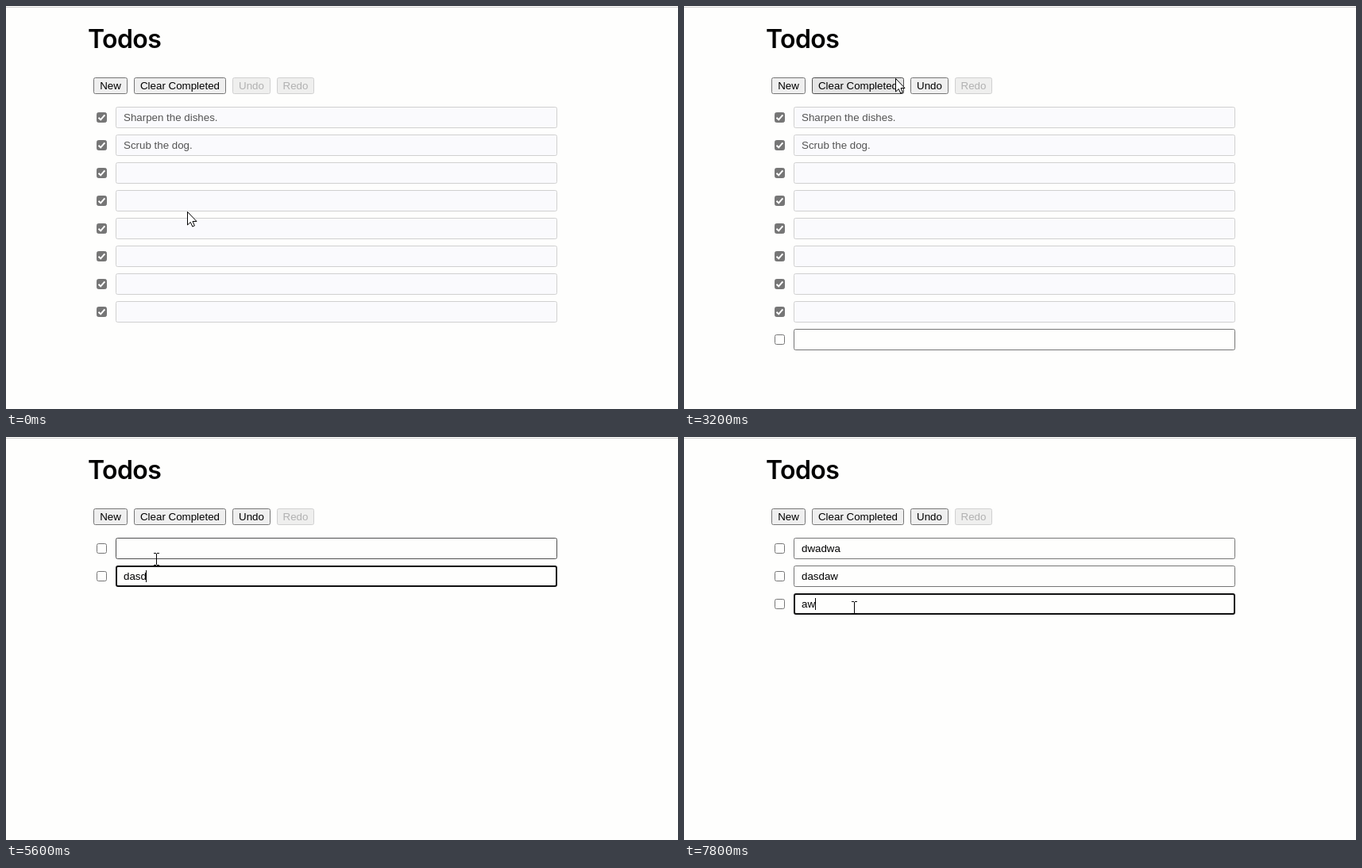
An HTML page with a canvas that plays this animation: 846 by 508 pixels, repeating every 8000 ms.

```html
<!DOCTYPE html>
<html lang="en">
<head>
<meta charset="utf-8">
<title>Todos</title>
<style>
html, body { margin: 0; width: 100%; height: 100%; overflow: hidden; background: #fefefd; }
canvas { display: block; }
</style>
</head>
<body>
<canvas id="stage" width="846" height="508"></canvas>
<script>
const ctx = document.getElementById('stage').getContext('2d');
const LOOP = 8000, STEP = 200, LETTER = 100;
const PAPER = '#fefefd', EDGE = '#767676', DARK_EDGE = '#4f4f4f', PALE_EDGE = '#d0d0d0';
const UI = '13.3333px "Liberation Sans", Arial, sans-serif';

const BUTTONS = [
  { label: 'New', x: 110, w: 43 },
  { label: 'Clear Completed', x: 161, w: 116 },
  { label: 'Undo', x: 285, w: 48 },
  { label: 'Redo', x: 341, w: 47 }
];
const BUTTON_LOOK = {
  normal: ['#efefef', EDGE, '#000'],
  hover: ['#e5e5e5', DARK_EDGE, '#000'],
  active: ['#f5f5f5', '#8d8d8d', '#000'],
  disabled: ['#efefee', PALE_EDGE, '#b1b1b1']
};

// Each press lasts one step and takes effect on release
const CLICKS = [
  { at: 1400, label: 'New' },
  { at: 3600, label: 'Clear Completed' },
  { at: 4400, label: 'New' },
  { at: 6800, label: 'New' }
];
const TYPING = [
  { row: 1, word: 'dasdaw', from: 5200, until: 6000 },
  { row: 0, word: 'dwadwa', from: 6000, until: 6600 },
  { row: 2, word: 'aw', from: 7600, until: LOOP }
];

// Stops of the pointer: time, x, y
const STOPS = [
  [0, 228, 259], [200, 229, 264], [1200, 130, 34], [1400, 127, 104],
  [2400, 124, 379], [2800, 296, 98], [3000, 290, 34], [3200, 266, 91],
  [3800, 264, 95], [4600, 123, 95], [4800, 123, 95], [5200, 188, 175],
  [5600, 189, 154], [6600, 142, 114], [6800, 122, 95], [7200, 150, 245],
  [7800, 214, 215]
];

const ease = u => u * u * (3 - 2 * u);

function pointerAt(t) {
  const next = STOPS.findIndex(stop => stop[0] > t);
  if (next < 0) return STOPS.at(-1).slice(1);
  const [t0, x0, y0] = STOPS[next - 1], [t1, x1, y1] = STOPS[next];
  const u = ease((t - t0) / (t1 - t0));
  return [Math.round(x0 + (x1 - x0) * u), Math.round(y0 + (y1 - y0) * u)];
}

function todosAt(t) {
  let todos = Array.from({ length: 8 }, () => ({ text: '', done: true }));
  todos[0].text = 'Sharpen the dishes.';
  todos[1].text = 'Scrub the dog.';
  for (const click of CLICKS) {
    if (t < click.at + STEP) break;
    if (click.label === 'New') todos.push({ text: '', done: false });
    else todos = todos.filter(todo => !todo.done);
  }
  for (const { row, word, from, until } of TYPING) {
    if (t < from) continue;
    todos[row].text = word.slice(0, Math.floor((t - from) / LETTER));
    todos[row].focused = t < until;
  }
  return todos;
}

const inside = (px, py, x, y, w, h) =>
  px >= x && px <= x + w && py >= y && py <= y + h;

function box(x, y, w, h, fill, edge, line = 1) {
  const d = line / 2;
  ctx.beginPath();
  ctx.roundRect(x + d, y + d, w - line, h - line, 2);
  ctx.fillStyle = fill;
  ctx.fill();
  ctx.strokeStyle = edge;
  ctx.lineWidth = line;
  ctx.stroke();
}

function label(text, x, y, color, align = 'left') {
  ctx.font = UI;
  ctx.textAlign = align;
  ctx.fillStyle = color;
  ctx.fillText(text, x, y);
}

function drawTitle() {
  ctx.font = '600 32px Inter, Arial, sans-serif';
  ctx.letterSpacing = '-0.6px';
  ctx.textAlign = 'left';
  ctx.fillStyle = '#000';
  ctx.fillText('Todos', 103, 53);
  ctx.letterSpacing = '0px';
}

function drawButton({ label: name, x, w }, t, px, py) {
  const pressed = CLICKS.some(c => c.label === name && t >= c.at && t < c.at + STEP);
  const canUndo = t >= CLICKS[0].at + STEP;
  let look = 'normal';
  if (name === 'Redo' || (name === 'Undo' && !canUndo)) look = 'disabled';
  else if (pressed) look = 'active';
  else if (inside(px, py, x, 90, w, 21)) look = 'hover';
  const [fill, edge, ink] = BUTTON_LOOK[look];
  box(x, 90, w, 21, fill, edge);
  label(name, x + w / 2, 105, ink, 'center');
}

function drawCheck(y, checked) {
  box(114, y, 13, 13, checked ? EDGE : PAPER, EDGE);
  if (!checked) return;
  ctx.beginPath();
  ctx.moveTo(116.5, y + 6.7);
  ctx.lineTo(119.2, y + 9.4);
  ctx.lineTo(124.4, y + 3.4);
  ctx.strokeStyle = '#fff';
  ctx.lineWidth = 2;
  ctx.stroke();
}

function drawTodo({ text, done, focused }, y, over) {
  drawCheck(y + 7, done);
  if (focused) box(138, y, 556, 27, PAPER, '#101010', 2);
  else if (done) box(138, y, 556, 27, '#fafafd', PALE_EDGE);
  else box(138, y, 556, 27, PAPER, over ? DARK_EDGE : EDGE);
  label(text, 148, y + 18, done ? '#545454' : '#000');
  if (focused) {
    const x = 148 + Math.floor(ctx.measureText(text).width);
    ctx.fillRect(x, y + 6, 1, 15);
  }
}

function drawArrow(x, y) {
  ctx.beginPath();
  [[0, 0], [0, 16.5], [3.8, 13], [6.3, 18.6], [8.9, 17.4], [6.5, 12], [11.5, 12]]
    .forEach(([dx, dy]) => ctx.lineTo(x + 0.5 + dx, y + 0.5 + dy));
  ctx.closePath();
  ctx.fillStyle = '#fff';
  ctx.fill();
  ctx.strokeStyle = '#000';
  ctx.lineWidth = 1;
  ctx.stroke();
}

function drawBeam(x, y) {
  ctx.fillStyle = '#000';
  ctx.fillRect(x, y - 7, 1, 14);
  for (const end of [y - 8, y + 7]) {
    ctx.fillRect(x - 3, end, 3, 1);
    ctx.fillRect(x + 1, end, 3, 1);
  }
}

function draw(t) {
  const [px, py] = pointerAt(t);
  ctx.fillStyle = PAPER;
  ctx.fillRect(0, 0, 846, 508);
  ctx.fillStyle = PALE_EDGE;
  ctx.fillRect(0, 1, 846, 1);

  drawTitle();
  BUTTONS.forEach(button => drawButton(button, t, px, py));

  let overText = false;
  todosAt(t).forEach((todo, i) => {
    const y = 127 + 35 * i;
    const over = !todo.done && inside(px, py, 138, y, 556, 27);
    drawTodo(todo, y, over);
    overText ||= over;
  });
  (overText ? drawBeam : drawArrow)(px, py);
}

function tick() {
  const t = performance.now() % LOOP;
  draw(Math.floor(t / STEP) * STEP);
  requestAnimationFrame(tick);
}
tick();
</script>
</body>
</html>
```
